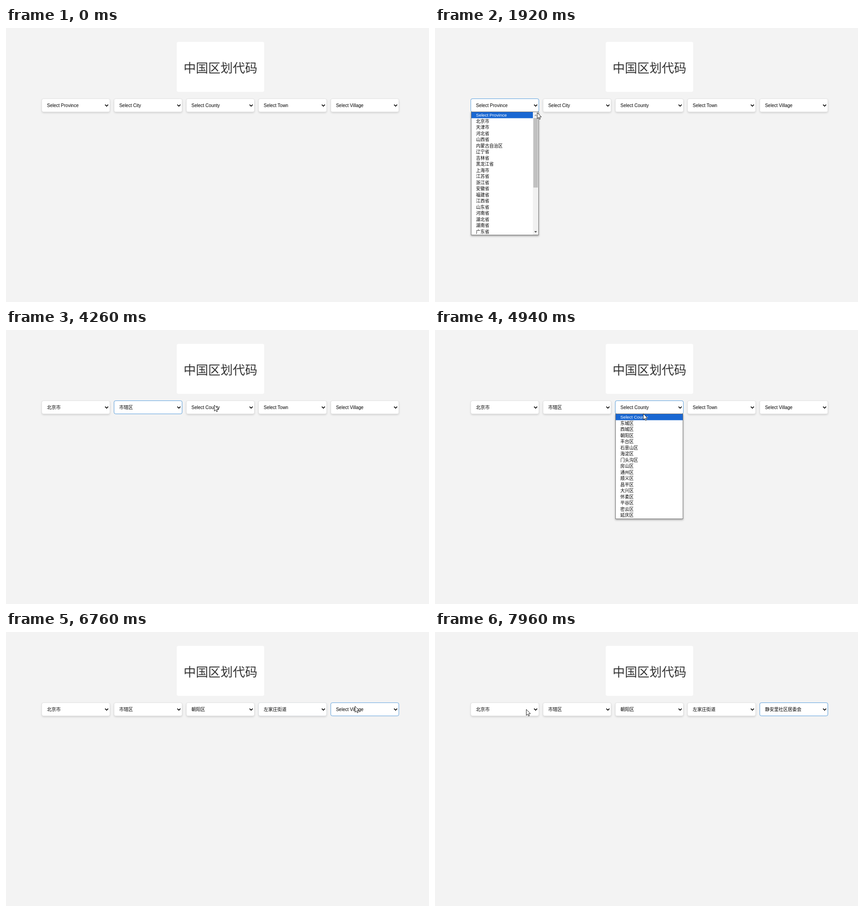
Animation, 929 px wide and 603 px high, one loop 7990 ms. Source, as an HTML page with a canvas:

```html
<!DOCTYPE html>
<html lang="zh-CN">
<head>
<meta charset="utf-8">
<style>
  html, body { margin: 0; height: 100%; overflow: hidden; background: #f3f3f3; }
  canvas { display: block; }
</style>
</head>
<body>
<canvas id="stage" width="929" height="603"></canvas>
<script>
const ctx = document.getElementById('stage').getContext('2d');
const LOOP = 7990, ROW = 13.5, TOP = 156, LIST_TOP = 185, WIDTH = 149;
const FADE = 140, OPEN_DELAY = 200, PAUSE = 100, TRAVEL = 400;
const FONT = '"Liberation Sans", "Noto Sans CJK SC", "Noto Sans CJK", sans-serif';

const list = (names, suffix = '') => names.split(' ').map(name => name + suffix);

// stops: time and place inside the field where the pointer rests before choosing a row;
// total counts all rows of a scrolling list
const fields = [
  { label: 'Select Province', focus: 890, chosen: 2040, close: 2600, pick: 1, total: 32,
    stops: [[680, 97, 12], [1110, 97, 18], [1740, 169, 50], [1920, 145, 30]],
    items: list('北京市 天津市 河北省 山西省 内蒙古自治区 辽宁省 吉林省 黑龙江省 上海市 江苏省 浙江省 安徽省 福建省 江西省 山东省 河南省 湖北省 湖南省 广东省') },
  { label: 'Select City', focus: 3140, chosen: 3540, close: 3660, pick: 1, minHeight: 49,
    stops: [[3020, 31, 17]],
    items: ['市辖区'] },
  { label: 'Select County', focus: 4490, chosen: 5220, close: 5290, pick: 3,
    stops: [[4260, 61, 9]],
    items: list('东城 西城 朝阳 丰台 石景山 海淀 门头沟 房山 通州 顺义 昌平 大兴 怀柔 平谷 密云 延庆', '区') },
  { label: 'Select Town', focus: 5540, chosen: 6070, close: 6220, pick: 5, total: 44,
    stops: [[5600, 71, 17]],
    items: list('建外 朝外 呼家楼 三里屯 左家庄 香河园 和平街 安贞 亚运村 小关 酒仙桥 麦子店 团结湖 六里屯 八里庄 双井 劲松 潘家园 垡头', '街道') },
  { label: 'Select Village', focus: 6630, chosen: 7020, close: 7100, pick: 1,
    stops: [[6600, 52, 7]],
    items: list('静安里 静安东里 曙光里 三源里 新源里 新源西里 左北里 左南里 左东里 顺源里 柳芳里 顺源街 静源里', '社区居委会') }
];

const clamp = (v, lo, hi) => Math.min(hi, Math.max(lo, v));

// The pointer rests after each event, then travels so that it arrives on time
const moves = [{ start: 310, end: 310, x: 349, y: 79 }];
let ready = 310;
function moveTo(end, x, y) {
  moves.push({ start: Math.max(ready, end - TRAVEL), end, x, y });
  ready = end + PAUSE;
}

fields.forEach((field, i) => {
  field.x = 79 + i * 158.67;
  field.rows = [field.label, ...field.items];
  field.open = field.focus + OPEN_DELAY;
  field.blur = fields[i + 1]?.focus ?? LOOP;
  for (const [time, dx, dy] of field.stops) moveTo(time, field.x + dx, TOP + dy);
  ready = Math.max(ready, field.open + PAUSE);
  const last = moves.at(-1);
  moveTo(field.chosen, Math.min(last.x, field.x + 87), LIST_TOP + (field.pick + 0.5) * ROW - 4);
  ready = field.close + PAUSE;
});
moveTo(7800, 395, 170);
moveTo(7960, 200, 170);

function pointerAt(t) {
  if (t < moves[0].start) return null;
  const i = moves.findLastIndex(move => t >= move.start);
  const to = moves[i], from = moves[i - 1] ?? to;
  const k = clamp((t - to.start) / (to.end - to.start || 1), 0, 1);
  return { x: Math.round(from.x + (to.x - from.x) * k), y: Math.round(from.y + (to.y - from.y) * k) };
}

function rect(x, y, w, h, color) {
  ctx.fillStyle = color;
  ctx.fillRect(x, y, w, h);
}

function panel(x, y, w, h, radius, shadow = 0) {
  ctx.save();
  ctx.shadowColor = `rgba(0,0,0,${shadow})`;
  ctx.shadowBlur = 4;
  ctx.shadowOffsetY = 2;
  ctx.fillStyle = '#fff';
  ctx.beginPath();
  ctx.roundRect(x, y, w, h, radius);
  ctx.fill();
  ctx.restore();
}

function text(string, x, y, size, color) {
  ctx.font = `${size}px ${FONT}`;
  ctx.fillStyle = color;
  ctx.fillText(string, x, y);
}

function triangle(x, y, dy, color) {
  ctx.fillStyle = color;
  ctx.beginPath();
  ctx.moveTo(x - 3, y);
  ctx.lineTo(x + 3, y);
  ctx.lineTo(x, y + dy);
  ctx.fill();
}

function drawField(field, t) {
  const { x } = field;
  const fade = since => clamp((t - since) / FADE, 0, 1);
  const focus = fade(field.focus) - fade(field.blur);
  panel(x, TOP, WIDTH, 28.5, 3, 0.17 * (1 - focus));
  ctx.lineWidth = 1;
  ctx.beginPath();
  ctx.roundRect(x - 0.4, TOP - 0.4, WIDTH + 0.5, 29, 3.5);
  ctx.strokeStyle = '#e3e3e3';
  ctx.stroke();
  ctx.strokeStyle = `rgba(92,162,224,${focus})`;
  ctx.stroke();

  text(t < field.close ? field.label : field.rows[field.pick], x + 11, 174, 10, '#000');
  ctx.strokeStyle = '#000';
  ctx.lineWidth = 1.7;
  ctx.beginPath();
  ctx.moveTo(x + 138.6, 168.6);
  ctx.lineTo(x + 142, 172);
  ctx.lineTo(x + 145.4, 168.6);
  ctx.stroke();
}

function drawList({ x: left, rows, total, minHeight = 0 }, pointer) {
  const x = Math.round(left);
  const height = Math.max(rows.length * ROW, minHeight);
  const hovered = pointer.x < x + WIDTH ? Math.floor((pointer.y - LIST_TOP) / ROW) : 0;
  const active = clamp(hovered, 0, rows.length - 1);

  panel(x, LIST_TOP - 1, WIDTH, height + 2, 0, 0.35);
  ctx.strokeStyle = '#777';
  ctx.lineWidth = 1;
  ctx.strokeRect(x + 0.5, LIST_TOP - 0.5, WIDTH - 1, Math.round(height) + 1);
  rows.forEach((row, i) => {
    const y = LIST_TOP + i * ROW;
    if (i === active) rect(x + 1, Math.round(y), WIDTH - 2, ROW, '#1967d2');
    text(row, x + 11, y + 10.1, 9.75, i === active ? '#fff' : '#000');
  });

  if (total) {
    const barX = x + 136;
    rect(barX, LIST_TOP, 12, height, '#f1f1f1');
    rect(barX + 1, LIST_TOP + 13, 10, (height - 25) * rows.length / total, '#c1c1c1');
    triangle(barX + 6, LIST_TOP + 8.5, -3.5, '#a3a3a3');
    triangle(barX + 6, LIST_TOP + height - 8, 3.5, '#505050');
  }
}

const arrow = new Path2D('M0 0V16.5L3.8 13L6.2 18.4L8.7 17.3L6.4 12L11.5 11.8Z');
function drawPointer({ x, y }) {
  ctx.save();
  ctx.translate(x + 0.5, y + 0.3);
  ctx.scale(0.8, 0.8);
  ctx.fillStyle = '#fff';
  ctx.fill(arrow);
  ctx.strokeStyle = '#111';
  ctx.lineWidth = 1.15;
  ctx.stroke(arrow);
  ctx.restore();
}

function frame() {
  const t = performance.now() % LOOP;
  const pointer = pointerAt(t);
  rect(0, 0, 929, 603, '#f3f3f3');
  panel(375, 30.5, 192, 110, 4);
  text('中国区划代码', 390, 98, 27, '#333');
  fields.forEach(field => drawField(field, t));
  const opened = fields.find(field => t >= field.open && t < field.close);
  if (opened) drawList(opened, pointer);
  if (pointer) drawPointer(pointer);
  requestAnimationFrame(frame);
}
frame();
</script>
</body>
</html>
```
